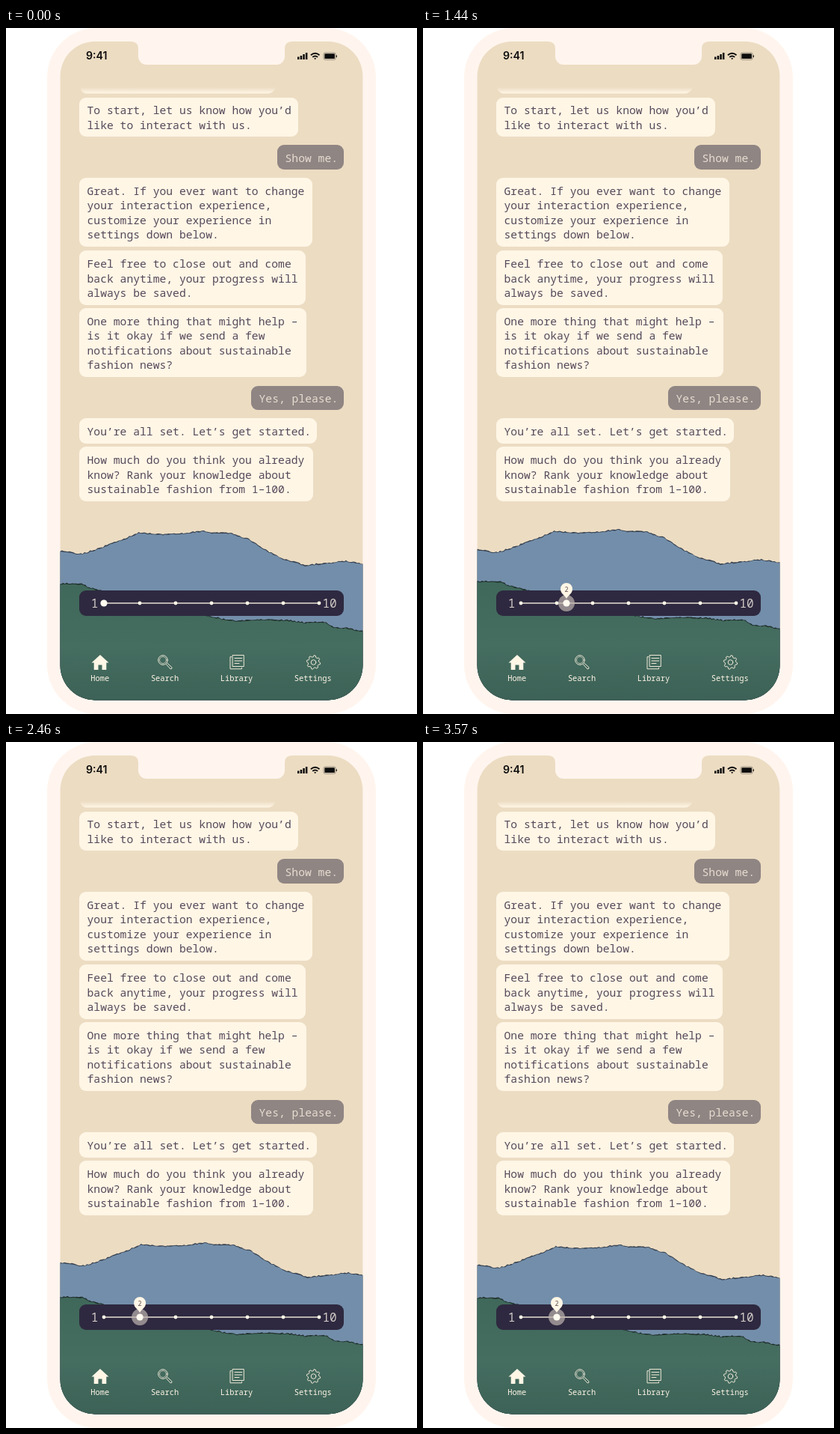
Animation, 550 px wide and 916 px high, one loop 3.6 s. Source, as an HTML page:

```html
<!DOCTYPE html>
<html lang="en">
<head>
<meta charset="utf-8">
<title>Chat with slider</title>
<style>
  html, body { margin: 0; width: 100%; height: 100%; overflow: hidden; background: #fff; }
  svg { display: block; width: 550px; height: 916px; }
  text { font-family: "Noto Sans Mono", "DejaVu Sans Mono", monospace; font-size: 14.7px; }
  .them { fill: #55495a; }
  .me { fill: #e8ddd0; }
  .tab { font-size: 10.4px; fill: #fff6e6; text-anchor: middle; font-weight: 500; }
  .num { font-size: 16px; fill: #d2cac6; text-anchor: middle; }
  .clock { font: 600 14.2px Inter, sans-serif; fill: #0c0c0c; text-anchor: middle; }
  .icon { fill: none; stroke: #efe9d8; stroke-width: 1; stroke-linejoin: round; stroke-linecap: round; }
</style>
</head>
<body>
<svg viewBox="0 0 550 916" xmlns="http://www.w3.org/2000/svg">
  <defs>
    <clipPath id="screen"><rect x="72.6" y="18" width="404.800" height="879.400" rx="46.500"/></clipPath>
    <linearGradient id="fade" x1="0" y1="0" x2="0" y2="1">
      <stop offset="0" stop-color="#fff6e6" stop-opacity="0"/>
      <stop offset="1" stop-color="#fff6e6"/>
    </linearGradient>
    <linearGradient id="grass" x1="0" y1="0" x2="0" y2="1">
      <stop offset="0" stop-color="#3f685a"/>
      <stop offset=".45" stop-color="#456d60"/>
      <stop offset="1" stop-color="#395c52"/>
    </linearGradient>
  </defs>

  <rect x="55" width="440" height="916" rx="66" fill="#fff5ee"/>
  <g clip-path="url(#screen)">
    <rect x="72" y="18" width="406" height="880" fill="#ecdcc2"/>
    <path d="M99 79H361Q358 87.500 350 87.500H108Q101 87.500 99 79Z" fill="url(#fade)"/>
    <g id="chat"></g>
    <g id="blue"></g>
    <g id="green"></g>
  </g>

  <path d="M166 17.500V18Q177 18 177 27V38A11 11 0 0 0 188 49H362A11 11 0 0 0 373 38V27Q373 18 384 18V17.500Z" fill="#fff5ee"/>

  <text class="clock" x="121.200" y="42">9:41</text>
  <g fill="#0c0c0c">
    <path d="M390 38.500h2.500v3.500h-2.500zM393.700 37h2.500v5h-2.500zM397.300 35h2.500v7h-2.500zM400.900 33h2.500v9h-2.500z"/>
    <rect x="426.300" y="34.300" width="13.600" height="6.800" rx="1.200"/>
    <rect x="441.600" y="36.200" width="1.200" height="3" rx=".6"/>
  </g>
  <rect x="425" y="33" width="16.200" height="9.400" rx="2.400" fill="none" stroke="#0c0c0c" stroke-opacity=".45" stroke-width=".8"/>
  <g fill="none" stroke="#0c0c0c" stroke-width="1.900">
    <path d="M407.900 36.300Q413.700 31.300 419.500 36.300M410.200 38.900Q413.700 35.900 417.200 38.900"/>
    <path d="M413.700 42.200l-1.500-1.600q1.500-1.100 3 0z" fill="#0c0c0c" stroke="none"/>
  </g>

  <g id="slider">
    <rect x="98" y="751" width="354" height="34" rx="9" fill="#2e2940"/>
    <text class="num" x="118.500" y="773.600">1</text>
    <text class="num" x="433" y="773.600">10</text>
    <path d="M131 768H419" stroke="#e9e0d3" stroke-width="1.500"/>
    <g id="stops" fill="#fff6e6"></g>
    <g id="thumb">
      <circle id="halo" r="11" fill="#bcb2ad" fill-opacity=".72"/>
      <circle r="4.600" fill="#fffaf0"/>
      <g id="pin">
        <path d="M0 -6C-2.500 -11 -8 -12.500 -8 -19A8 8 0 0 1 8 -19C8 -12.500 2.500 -11 0 -6Z" fill="#fff6e6"/>
        <g id="digit"><text y="3" text-anchor="middle" style="font-size:8.500px" fill="#5d4a4c">1</text></g>
      </g>
    </g>
  </g>

  <path d="M126 837L137.500 847.500H134.300V857H128.500V850.500H123.500V857H117.700V847.500H114.500Z" fill="#fff6e6"/>
  <g class="icon">
    <circle cx="210" cy="844" r="6.300"/><circle cx="210" cy="844" r="4.500" stroke-width=".7"/>
    <path d="M214.200 849.500L220.200 856Q222.800 855.800 221.800 853.500L215.500 847.800"/>
    <path d="M303.500 837.500H318.300V852.500H303.500ZM301.800 839.700H300V855.800H315.500V854.200M306 841.500H315.800M306 845H315.800M306 848.500H312"/>
    <path id="gear"/><circle cx="411.500" cy="847" r="3.300"/>
  </g>
  <text class="tab" x="125.800" y="871.500">Home</text>
  <text class="tab" x="212.600" y="871.500">Search</text>
  <text class="tab" x="308.500" y="871.500">Library</text>
  <text class="tab" x="410.800" y="871.500">Settings</text>
</svg>

<script>
const LOOP = 3600;
const $ = id => document.getElementById(id);

function add(parent, tag, attrs, text) {
  const el = document.createElementNS("http://www.w3.org/2000/svg", tag);
  for (const key in attrs) el.setAttribute(key, attrs[key]);
  if (text) el.textContent = text;
  parent.append(el);
  return el;
}

// Chat bubbles: x, y, width, height, lines
function bubble(who, x, y, w, h, ...lines) {
  const mine = who === "me";
  add($("chat"), "rect", { x, y, width: w, height: h, rx: 9, fill: mine ? "#8f8583" : "#fff6e6" });
  const first = y + h / 2 - (lines.length - 1) * 9.8 + 6;
  lines.forEach((line, i) =>
    add($("chat"), "text", { class: who, x: x + 10.5, y: first + i * 19.6 }, line));
}
bubble("them", 98, 93, 293, 52, "To start, let us know how you’d", "like to interact with us.");
bubble("me", 363, 156, 89, 33, "Show me.");
bubble("them", 98, 200, 312, 92, "Great. If you ever want to change",
  "your interaction experience,", "customize your experience in", "settings down below.");
bubble("them", 98, 297, 303, 73, "Feel free to close out and come",
  "back anytime, your progress will", "always be saved.");
bubble("them", 98, 374, 304, 92, "One more thing that might help –",
  "is it okay if we send a few", "notifications about sustainable", "fashion news?");
bubble("me", 328, 478, 124, 32, "Yes, please.");
bubble("them", 98, 521, 318, 34, "You’re all set. Let’s get started.");
bubble("them", 98, 559, 313, 73, "How much do you think you already",
  "know? Rank your knowledge about", "sustainable fashion from 1–100.");

// Torn paper: a ragged sheet lying over a slightly higher dark rim
function random(seed) {
  return () => (seed = (seed * 16807) % 2147483647) / 2147483647;
}

function heightAt(pts, x) {
  let i = 0;
  while (i < pts.length - 2 && x > pts[i + 1][0]) i++;
  const [a, b] = [pts[i], pts[i + 1]];
  return a[1] + (b[1] - a[1]) * (x - a[0]) / (b[0] - a[0]);
}

function tornPaper(id, pts, fill, rim, seed) {
  const rnd = random(seed);
  let sheet = "M50 930", shade = "M50 930";
  for (let x = 50; x <= 500; x += 2.5) {
    const y = heightAt(pts, x) + (rnd() - 0.5) * 1.4;
    sheet += `L${x} ${(y + 0.6).toFixed(1)}`;
    shade += `L${x} ${(y - rnd() * 1.2).toFixed(1)}`;
  }
  add($(id), "path", { d: shade + "L500 930Z", fill: rim });
  add($(id), "path", { d: sheet + "L500 930Z", fill });
}

tornPaper("blue", [[50, 696], [72, 699], [100, 703], [118, 698], [140, 689], [160, 682], [179, 674],
  [200, 677], [240, 675], [262, 672], [278, 675], [300, 675], [325, 683], [345, 696], [370, 709],
  [400, 718], [430, 715], [455, 712], [478, 716], [500, 717]], "#738eaa", "#35404f", 77);
tornPaper("green", [[50, 740], [72, 741], [103, 741], [112, 746], [128, 750], [200, 768], [272, 784],
  [290, 788], [310, 790.5], [345, 789], [380, 790], [400, 793], [415, 791.5], [430, 793],
  [440, 799], [455, 800], [478, 804.5], [500, 808]], "url(#grass)", "#1d2c28", 4242);

for (let i = 0; i < 7; i++) add($("stops"), "circle", { cx: 131 + 48 * i, cy: 768, r: 2.4 });

let gear = "";
for (let i = 0; i < 32; i++) {
  const a = (i + 0.5) * Math.PI / 16, r = i % 4 < 2 ? 9.2 : 7.2;
  gear += `${i ? "L" : "M"}${(411.5 + r * Math.sin(a)).toFixed(1)} ${(847 - r * Math.cos(a)).toFixed(1)}`;
}
$("gear").setAttribute("d", gear + "Z");

const ease = u => u < 0.5 ? 4 * u ** 3 : 1 - (2 - 2 * u) ** 3 / 2;
const part = (t, from, to) => ease(Math.min(1, Math.max(0, (t - from) / (to - from))));
const wave = (t, peak) => Math.cos(2 * Math.PI * (t - peak) / LOOP);
const place = (id, x, y, s = 1) =>
  $(id).setAttribute("transform", `translate(${x.toFixed(2)} ${y.toFixed(2)}) scale(${s.toFixed(3)})`);

function draw(t) {
  place("blue", 3.5 * wave(t, 2700), 1.75 * (wave(t, 350) - 1));
  place("green", 1.5 * wave(t, 1470), 1.7 * wave(t, 3200));

  const press = part(t, 660, 900);
  const x = 131 + 61 * part(t, 930, 1420) - 13 * part(t, 2000, 2530);
  place("thumb", x, 768);
  place("halo", 0, 0, press);
  place("pin", 0, 0, press);
  place("digit", 0, -18.5, 0.3 + 0.7 * part(t, 880, 1080));
  $("digit").firstChild.textContent = x < 155 ? "1" : "2";
}

function tick(now) {
  draw(now % LOOP);
  requestAnimationFrame(tick);
}
draw(0);
requestAnimationFrame(tick);
</script>
</body>
</html>
```
